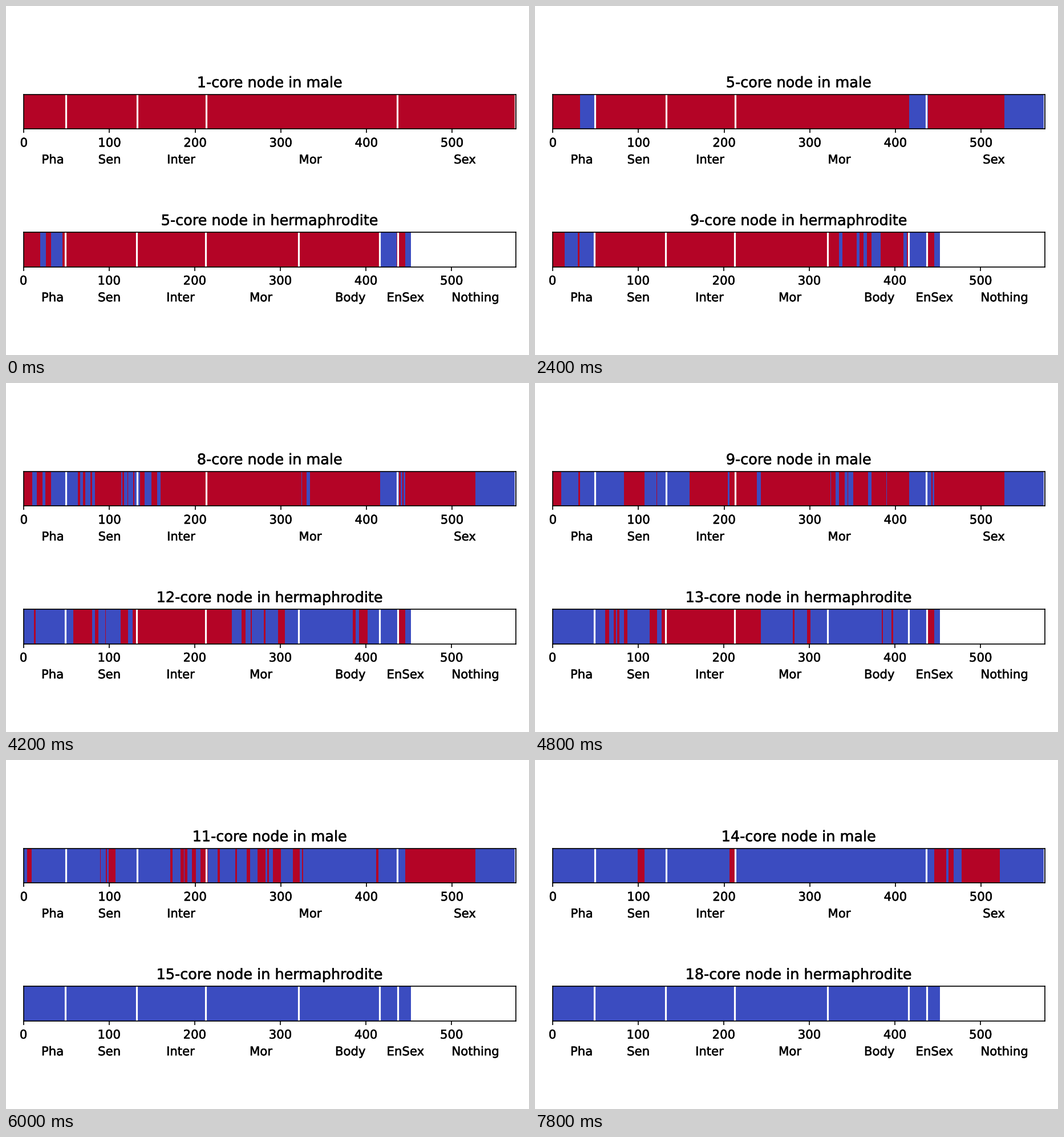
A matplotlib script that plays this animation: 917 by 611 pixels, repeating every 8 s.

```python
import matplotlib.pyplot as plt
import numpy as np
from matplotlib.animation import FuncAnimation
from matplotlib.colors import ListedColormap
from matplotlib.patheffects import withStroke

W, H = 917, 611
DPI = W / 6
LEFT, CELL, CELLS = 30.6, 1.5013, 575
BAR_H = 60.5
HERM_CELLS = 452
HERM_DONE = 10
STEP_MS, TICK_MS, LOOP_MS = 600, 200, 8000
RED, BLUE, BLANK = 0, 1, 2

# (last cell, mean step at which the stretch turns blue)
MALE = [(10, 10), (32, 7), (50, 2), (62, 6), (83, 7), (99, 9.5), (107, 20),
        (121, 7), (160, 7.5), (206, 10), (213, 20), (273, 9.7), (322, 10.5),
        (351, 9), (416, 9), (438, 1.7), (445, 8), (527, 14.5), (575, 3)]
HERM = [(14, 6.5), (19, 3), (26, -1), (31, 4), (50, -1), (58, 5.5), (78, 9),
        (99, 7.5), (113, 6.5), (132, 9), (213, 11), (243, 9.5), (305, 7.5),
        (355, 5.5), (384, 4.5), (409, 7.5), (416, 4.5), (437, -1),
        (445, 8.5), (452, -1)]


def onsets(stretches, seed):
    """Step at which each cell turns blue, scattered in short runs."""
    rng = np.random.default_rng(seed)
    steps = np.zeros(CELLS)
    pos = 0
    for stop, mean in stretches:
        while pos < stop:
            end = min(pos + rng.integers(1, 6), stop)
            steps[pos:end] = round(mean + rng.triangular(-2, 0, 2))
            pos = end
    return steps


male = onsets(MALE, 4)
herm = np.minimum(onsets(HERM, 9), HERM_DONE)

fig = plt.figure(figsize=((W + 0.001) / DPI, (H + 0.001) / DPI), dpi=DPI,
                 facecolor="white")
cmap = ListedColormap(["#b40426", "#3b4cc0", "#ffffff"])
bold = [withStroke(linewidth=0.25, foreground="black")]


def add_bar(mid, start, lines, groups):
    """One bar centred on height mid, with its dividers and group names."""
    ax = fig.add_axes([LEFT / W, 1 - (mid + BAR_H / 2) / H,
                       CELL * CELLS / W, BAR_H / H])
    img = ax.imshow(np.zeros((1, CELLS)), cmap=cmap, vmin=RED, vmax=BLANK,
                    aspect="auto", interpolation="nearest",
                    extent=(start, start + CELLS, 0, 1))
    for x in lines:
        ax.axvline(x, color="white", lw=1.5)
    ax.set_xlim(start, start + CELLS)
    ax.set_xticks(range(0, 600, 100))
    ax.set_yticks([])
    for label in ax.get_xticklabels():
        label.set_path_effects(bold)
    for name, x in groups.items():
        fig.text(x / W, 1 - (mid + 90.5) / H, name, fontsize=10, ha="center",
                 va="baseline", path_effects=bold)
    return img, ax.set_title("", fontsize=12, path_effects=bold)


male_img, male_title = add_bar(
    185.2, -0.5, [49, 132, 213, 436, 574],
    {"Pha": 82, "Sen": 181.5, "Inter": 307, "Mor": 533.5, "Sex": 804.5})
herm_img, herm_title = add_bar(
    426.6, 0, [49, 132, 213, 321, 416, 437],
    {"Pha": 81.5, "Sen": 181, "Inter": 306, "Mor": 447, "Body": 603.7,
     "EnSex": 700.3, "Nothing": 823})


def update(i):
    step = i * TICK_MS // STEP_MS
    male_img.set_data(np.where(male <= step, BLUE, RED)[None])
    cells = np.where(herm <= step, BLUE, RED)
    cells[HERM_CELLS:] = BLANK
    herm_img.set_data(cells[None])
    male_title.set_text(f"{step + 1}-core node in male")
    herm_title.set_text(f"{step + 5}-core node in hermaphrodite")
    return male_img, herm_img, male_title, herm_title


anim = FuncAnimation(fig, update, frames=LOOP_MS // TICK_MS,
                     interval=TICK_MS, repeat=True, repeat_delay=0)
plt.show()
```
